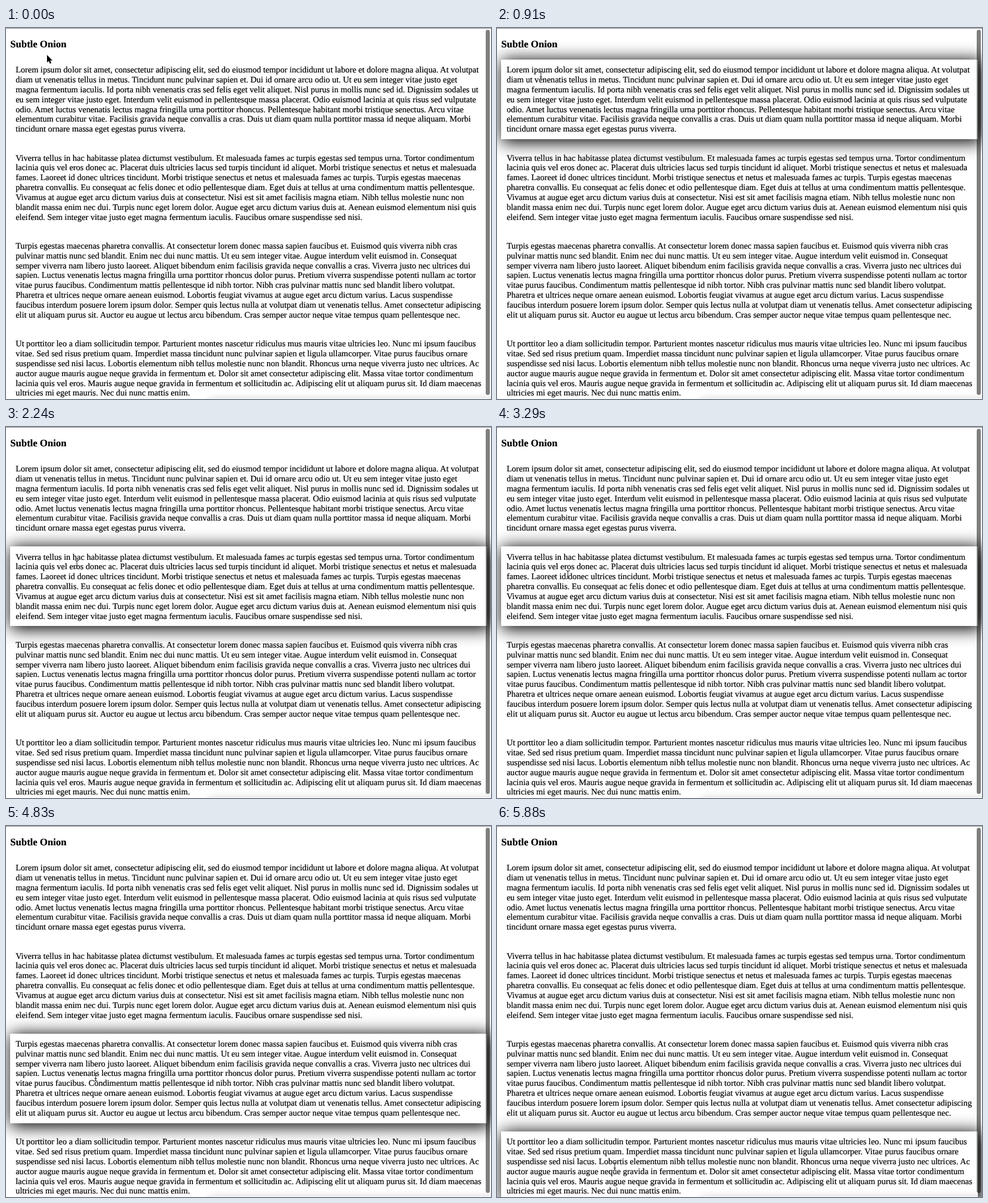
Write an HTML page that moves like this. It is 828x634 px and loops after 5950 ms.

```html
<!DOCTYPE html>
<html lang="la">
<head>
<meta charset="utf-8">
<title>Subtle Onion</title>
<style>
html, body { margin: 0; width: 100%; height: 100%; overflow: hidden; background: #fff; }
#stage {
  position: relative; width: 828px; height: 634px; overflow: hidden; color: #000;
  font-family: "Liberation Serif", Times, serif; text-rendering: geometricPrecision;
  -webkit-text-stroke: .2px #000;
}
h3 { position: absolute; left: 7.3px; top: 18px; margin: 0; font-size: 17px; line-height: 20px; white-space: pre; }
p {
  position: absolute; left: 7.3px; width: 795.2px; margin: 0; padding: 10.2px 9.1px 8px;
  font-size: 14.57px; line-height: 16.83px; white-space: pre;
}
p.on { box-shadow: 4px 2.5px 27px 3px #000; }
#edge { position: absolute; left: 0; top: 0; width: 828px; height: 1px; background: #858585; }
#glow {
  position: absolute; left: 345px; top: 633px; width: 500px; height: 30px;
  border-radius: 10px; box-shadow: 0 0 14px rgba(0, 0, 0, .16);
}
#thumb {
  position: absolute; left: 819px; top: 3px; width: 7px; height: 624px;
  border-radius: 3.5px; background: rgba(0, 0, 0, .5);
}
svg { position: absolute; left: 0; top: 0; }
</style>
</head>
<body>
<div id="stage">
<h3>Subtle Onion</h3>
<p>Lorem ipsum dolor sit amet, consectetur adipiscing elit, sed do eiusmod tempor incididunt ut labore et dolore magna aliqua. At volutpat
diam ut venenatis tellus in metus. Tincidunt nunc pulvinar sapien et. Dui id ornare arcu odio ut. Ut eu sem integer vitae justo eget
magna fermentum iaculis. Id porta nibh venenatis cras sed felis eget velit aliquet. Nisl purus in mollis nunc sed id. Dignissim sodales ut
eu sem integer vitae justo eget. Interdum velit euismod in pellentesque massa placerat. Odio euismod lacinia at quis risus sed vulputate
odio. Amet luctus venenatis lectus magna fringilla urna porttitor rhoncus. Pellentesque habitant morbi tristique senectus. Arcu vitae
elementum curabitur vitae. Facilisis gravida neque convallis a cras. Duis ut diam quam nulla porttitor massa id neque aliquam. Morbi
tincidunt ornare massa eget egestas purus viverra.</p>
<p>Viverra tellus in hac habitasse platea dictumst vestibulum. Et malesuada fames ac turpis egestas sed tempus urna. Tortor condimentum
lacinia quis vel eros donec ac. Placerat duis ultricies lacus sed turpis tincidunt id aliquet. Morbi tristique senectus et netus et malesuada
fames. Laoreet id donec ultrices tincidunt. Morbi tristique senectus et netus et malesuada fames ac turpis. Turpis egestas maecenas
pharetra convallis. Eu consequat ac felis donec et odio pellentesque diam. Eget duis at tellus at urna condimentum mattis pellentesque.
Vivamus at augue eget arcu dictum varius duis at consectetur. Nisi est sit amet facilisis magna etiam. Nibh tellus molestie nunc non
blandit massa enim nec dui. Turpis nunc eget lorem dolor. Augue eget arcu dictum varius duis at. Aenean euismod elementum nisi quis
eleifend. Sem integer vitae justo eget magna fermentum iaculis. Faucibus ornare suspendisse sed nisi.</p>
<p>Turpis egestas maecenas pharetra convallis. At consectetur lorem donec massa sapien faucibus et. Euismod quis viverra nibh cras
pulvinar mattis nunc sed blandit. Enim nec dui nunc mattis. Ut eu sem integer vitae. Augue interdum velit euismod in. Consequat
semper viverra nam libero justo laoreet. Aliquet bibendum enim facilisis gravida neque convallis a cras. Viverra justo nec ultrices dui
sapien. Luctus venenatis lectus magna fringilla urna porttitor rhoncus dolor purus. Pretium viverra suspendisse potenti nullam ac tortor
vitae purus faucibus. Condimentum mattis pellentesque id nibh tortor. Nibh cras pulvinar mattis nunc sed blandit libero volutpat.
Pharetra et ultrices neque ornare aenean euismod. Lobortis feugiat vivamus at augue eget arcu dictum varius. Lacus suspendisse
faucibus interdum posuere lorem ipsum dolor. Semper quis lectus nulla at volutpat diam ut venenatis tellus. Amet consectetur adipiscing
elit ut aliquam purus sit. Auctor eu augue ut lectus arcu bibendum. Cras semper auctor neque vitae tempus quam pellentesque nec.</p>
<p>Ut porttitor leo a diam sollicitudin tempor. Parturient montes nascetur ridiculus mus mauris vitae ultricies leo. Nunc mi ipsum faucibus
vitae. Sed sed risus pretium quam. Imperdiet massa tincidunt nunc pulvinar sapien et ligula ullamcorper. Vitae purus faucibus ornare
suspendisse sed nisi lacus. Lobortis elementum nibh tellus molestie nunc non blandit. Rhoncus urna neque viverra justo nec ultrices. Ac
auctor augue mauris augue neque gravida in fermentum et. Dolor sit amet consectetur adipiscing elit. Massa vitae tortor condimentum
lacinia quis vel eros. Mauris augue neque gravida in fermentum et sollicitudin ac. Adipiscing elit ut aliquam purus sit. Id diam maecenas
ultricies mi eget mauris. Nec dui nunc mattis enim.</p>
<div id="glow"></div>
<div id="thumb"></div>
<div id="edge"></div>
<svg width="828" height="634">
  <defs>
    <path id="bar" d="M-3 -7.2Q0 -7.2 0 -5Q0 -7.2 3 -7.2M0 -5V5M-3 7.2Q0 7.2 0 5Q0 7.2 3 7.2M-1.6 2.6H1.6"/>
  </defs>
  <g id="arrow">
    <path d="M0 0V13L3 10.3L5 15L7.4 14L5.4 9.4H9.4Z" stroke="#fff" stroke-width="1.6" stroke-linejoin="round" paint-order="stroke"/>
  </g>
  <g id="beam" fill="none" stroke-linecap="round">
    <use href="#bar" stroke="#fff" stroke-width="2.4" stroke-opacity=".6"/>
    <use href="#bar" stroke="#000" stroke-width=".9"/>
  </g>
</svg>
</div>
<script>
const LOOP = 5950, STEP = 70;
const arrow = document.getElementById('arrow');
const beam = document.getElementById('beam');

// Stack the paragraphs with a 1em gap
let y = 54;
const boxes = [...document.querySelectorAll('p')].map(el => {
  const lines = el.textContent.split('\n').length;
  const box = { el, top: y, bottom: y + lines * 16.83 + 18.2 };
  el.style.top = y + 'px';
  y = box.bottom + 14.4;
  return box;
});

// Pointer path: time, x, y
const path = [
  [0, 70, 46], [350, 72, 52], [630, 75, 77], [910, 75, 81], [1330, 77, 88],
  [1890, 119, 196], [2240, 121, 235], [2590, 121, 250], [3290, 121, 252.5],
  [3640, 138, 350], [3780, 147, 372], [4130, 150, 400], [4830, 153, 429],
  [5180, 160, 455], [5600, 190, 560], [5880, 201, 582]
];

function pointer(t) {
  t = Math.max(0, Math.min(t, 5880));
  const i = Math.max(1, path.findIndex(k => k[0] >= t));
  const [t0, x0, y0] = path[i - 1], [t1, x1, y1] = path[i];
  const u = (t - t0) / (t1 - t0);
  return [x0 + (x1 - x0) * u, y0 + (y1 - y0) * u];
}

const inside = (box, py) => py >= box.top && py < box.bottom;

function draw(now) {
  const t = Math.floor((now % LOOP) / STEP) * STEP;
  const [px, py] = pointer(t);
  // The shadow follows the pointer one step late
  const late = pointer(t - STEP)[1];
  for (const box of boxes) box.el.classList.toggle('on', inside(box, late));

  const overText = boxes.some(box => inside(box, py));
  const shown = overText ? beam : arrow;
  arrow.style.display = overText ? 'none' : '';
  beam.style.display = overText ? '' : 'none';
  shown.setAttribute('transform', `translate(${px.toFixed(1)} ${py.toFixed(1)})`);
}

const start = performance.now();
function tick() {
  draw(performance.now() - start);
  requestAnimationFrame(tick);
}
draw(0);
requestAnimationFrame(tick);
</script>
</body>
</html>
```
